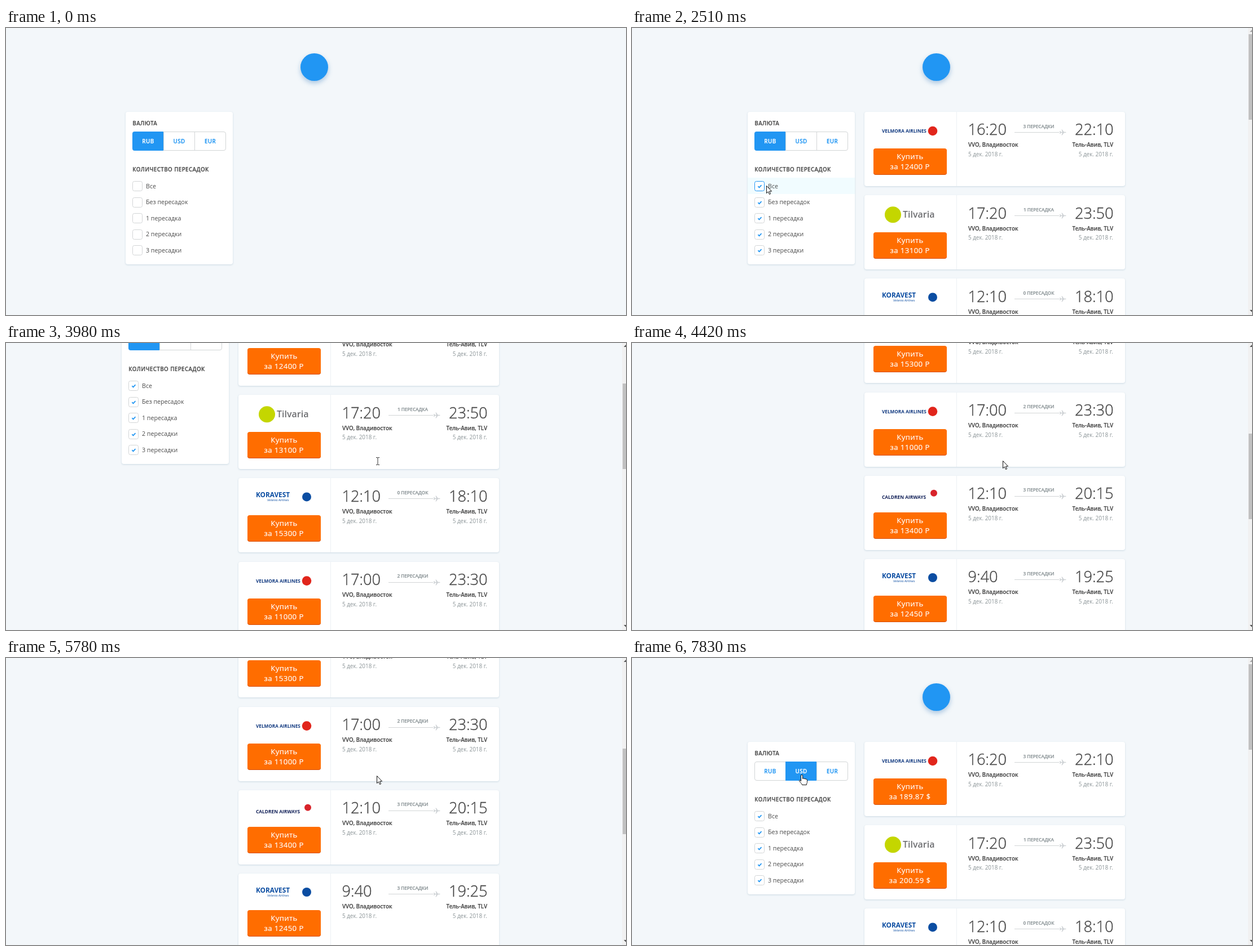
Animation of 1099 by 510 pixels, one loop 8 s. Source, as an HTML page:

```html
<!DOCTYPE html>
<html lang="ru">
<head>
<meta charset="utf-8">
<title>Билеты</title>
<style>
  html, body { margin: 0; width: 100%; height: 100%; overflow: hidden; background: #f3f7fa; }
  svg { display: block; width: 100vw; height: 100vh; font-family: "Open Sans", sans-serif; fill: #4a4a4a; }
  .box { fill: #fff; filter: drop-shadow(0 1px 1.6px rgba(91, 137, 164, .27)); }
  .badge { fill: #2196f3; filter: drop-shadow(0 4px 4px rgba(33, 110, 180, .35)); }
  .line { fill: none; stroke: #d2d5d6; }
  .head { font-size: 9.8px; font-weight: 600; letter-spacing: .41px; stroke: #4a4a4a; stroke-width: .22; }
  .label { font-size: 10.65px; }
  .time { font-size: 27.2px; font-weight: 300; stroke: #4a4a4a; stroke-width: .4; }
  .city { font-size: 9.8px; font-weight: 600; stroke: #4a4a4a; stroke-width: .22; }
  .date { font-size: 9.9px; fill: #8b9497; }
  .stops { font-size: 8.17px; font-weight: 600; fill: #8b9497; stroke: #8b9497; stroke-width: .22; }
  .buy { font-size: 13.2px; letter-spacing: .41px; fill: #fff; stroke: #fff; stroke-width: .2; }
  .mid { text-anchor: middle; }
  .end { text-anchor: end; }
  .tick { fill: none; stroke: #2196f3; stroke-width: 1.7; }
</style>
</head>
<body>
<svg id="stage" viewBox="0 0 1099 510"></svg>
<script>
const LOOP = 8000, SHOW = 2320, SWITCH = 7750, RATE = 65.307;
const TOP = 149, PITCH = 148.2, ROW = 28.6, BAR_SHIFT = -7;

const tabs = ['RUB', 'USD', 'EUR'];
const filters = ['Все', 'Без пересадок', '1 пересадка', '2 пересадки', '3 пересадки'];
const stopWords = ['ПЕРЕСАДОК', 'ПЕРЕСАДКА', 'ПЕРЕСАДКИ', 'ПЕРЕСАДКИ'];

// carrier, departure, arrival, stops, price
const flights = [
  ['velmora', '16:20', '22:10', 3, 12400],
  ['tilvaria', '17:20', '23:50', 1, 13100],
  ['koravest', '12:10', '18:10', 0, 15300],
  ['velmora', '17:00', '23:30', 2, 11000],
  ['caldren', '12:10', '20:15', 3, 13400],
  ['koravest', '9:40', '19:25', 3, 12450],
  ['velmora', '17:10', '23:45', 1, 13600],
  ['velmora', '6:10', '15:25', 0, 14250],
  ['koravest', '16:50', '23:35', 1, 16700],
  ['tilvaria', '18:20', '23:55', 2, 14900]
];

const text = (cls, x, y, s, extra = '') => `<text class="${cls}" x="${x}" y="${y}" ${extra}>${s}</text>`;
const dot = (x, y, r, fill) => `<circle cx="${x}" cy="${y}" r="${r}" fill="${fill}"/>`;
const word = (x, y, size, fill, s, weight = 700, style = 'normal') =>
  text('', x, y, s, `font-size="${size}" font-weight="${weight}" font-style="${style}" fill="${fill}"`);

const carriers = {
  velmora: word(443, 37, 8.2, '#123a80', 'VELMORA AIRLINES') + dot(533, 34, 8.3, '#e1251b'),
  tilvaria: dot(462.5, 34.5, 14.5, '#c4d600') + word(480, 40, 16, '#6d6e71', 'Tilvaria', 600),
  koravest: word(443, 34, 11.8, '#0b4da2', 'KORAVEST') +
    word(463, 41, 5.8, '#0b4da2', 'Velenia Airlines', 400, 'italic') + dot(533, 33, 8, '#0b4da2'),
  caldren: word(443, 41, 8.4, '#14235a', 'CALDREN AIRWAYS') + dot(535, 31, 6, '#d8232a')
};

const plane = 'M758.5 36.5l-.4-2.6h1l1.2 1.8h2.7l-1.6-4.2h1.2l3 4.2h2.4q1.6 .3 1.6 .8t-1.6 .8h-2.4l-3 4.2h-1.2l1.6-4.2h-2.7l-1.2 1.8h-1z';

// Boxes sit on whole pixels, text keeps its fraction.
function card([carrier, dep, arr, stops], i) {
  const exact = TOP + i * PITCH, y = Math.round(exact), f = exact - y;
  const button = Math.round(exact + 65.4) - y;
  return `<g transform="translate(0 ${y})">
    <rect class="box" x="412" width="462" height="132" rx="4"/>
    <path d="M575.5 0V132" stroke="#edf1f4"/>
    <g transform="translate(0 ${f})">${carriers[carrier]}</g>
    <rect x="428" y="${button + 1}" width="130" height="46" rx="4" fill="#d64d08"/>
    <rect x="428" y="${button}" width="130" height="46" rx="4" fill="#ff6d00"/>
    ${text('buy mid', 493, button + 18.9, 'Купить')}
    ${text('buy mid price', 492.6, button + 36.9, '')}
    ${text('time', 595.5, 41.3 + f, dep)}
    ${text('time end', 853.5, 41.3 + f, arr)}
    ${text('city', 596, 62.4 + f, 'VVO, Владивосток')}
    ${text('city end', 853, 62.4 + f, 'Тель-Авив, TLV')}
    ${text('date', 596, 79.2 + f, '5 дек. 2018 г.')}
    ${text('date end', 853, 79.2 + f, '5 дек. 2018 г.')}
    ${text('stops mid', 721, 28.6 + f, stops + ' ' + stopWords[stops])}
    <path class="line" d="M678 36.5H757"/>
    <path d="${plane}" fill="#cdd1d4"/>
  </g>`;
}

function filterRow(label, i) {
  const y = Math.round(281 + i * ROW);
  return `<rect class="hot" x="212" y="${y - 15}" width="190" height="29" fill="#f1fcff" visibility="hidden"/>
    <rect class="line check" x="224.5" y="${y - 8.5}" width="17" height="17" rx="3" style="fill:#fff"/>
    <path class="tick" d="M230.4 ${y + .2}l2.1 2.2l4-4.2"/>
    ${text('label', 248, 284.6 + i * ROW, label)}`;
}

function cellPath(i) {
  const x = 224.5 + i * 55, r = x + 54;
  const a = i === 0 ? 3 : 0, b = i === 2 ? 3 : 0;
  return `M${x + a} 184.5H${r - b}q${b} 0 ${b} ${b}V${217.5 - b}q0 ${b} ${-b} ${b}H${x + a}` +
    `q${-a} 0 ${-a} ${-a}V${184.5 + a}q0 ${-a} ${a} ${-a}z`;
}

const stage = document.getElementById('stage');
stage.innerHTML = `
  <rect width="1099" height="510" fill="#f3f7fa"/>
  <g id="page">
    <g id="side">
      <circle class="badge" cx="546.5" cy="69.5" r="24.5"/>
      <rect class="box" x="212" y="149" width="190" height="271" rx="4"/>
      ${text('head', 224.3, 172.6, 'ВАЛЮТА')}
      <rect class="line" x="224.5" y="184.5" width="165" height="33" rx="3.5"/>
      <path class="line" d="M279.5 184.5V217.5M334.5 184.5V217.5"/>
      <path id="over" stroke="#2196f3" fill="#f2fcff"/>
      <path id="chosen" stroke="#2196f3" fill="#2196f3"/>
      ${tabs.map((s, i) => text('head mid tab', 251.9 + i * 55.1, 204.7, s)).join('')}
      ${text('head', 224.3, 254.6, 'КОЛИЧЕСТВО ПЕРЕСАДОК')}
      ${filters.map(filterRow).join('')}
    </g>
    <g id="cards">${flights.map(card).join('')}</g>
  </g>
  <g id="bar">
    <rect x="1092" width="7" height="510" fill="#f1f1f1"/>
    <rect id="thumb" x="1093" width="6" height="152" fill="#c1c1c1"/>
    <path id="up" d="M1095 7L1099 3V7z"/>
    <path d="M1095 501H1099V505z" fill="#505050"/>
  </g>
  <path id="pointer" stroke-linejoin="round"/>`;

const $ = id => document.getElementById(id);
const all = cls => [...stage.getElementsByClassName(cls)];
const prices = all('price'), hots = all('hot'), checks = all('check'), ticks = all('tick'), tabTexts = all('tab');

const shapes = {
  arrow: { d: 'M.5 .5V13.6L3.5 10.9L5.5 15.6L7.6 14.7L5.6 10.1H9.6z', fill: '#fff', stroke: '#111' },
  hand: {
    d: 'M-1.5 11V1a1.5 1.5 0 0 1 3 0V6.5c.5-1 3-.8 3 .5c.5-1 2.8-.7 2.8 .8c.6-.8 2.2-.3 2.2 1V12.5c0 2-1.2 2.5-1.2 5H.5c0-2.5-4.5-5-5-7.5c0-1.5 1.8-1.5 3 1z',
    fill: '#fff', stroke: '#111'
  },
  beam: { d: 'M-3-6.5h2.2l.8.8l.8-.8H3M0-6V6M-3 6.5h2.2l.8-.8l.8 .8H3', fill: 'none', stroke: '#333' }
};

const scrollKeys = [[3690, 0], [3980, 204], [4420, 506], [4470, 530], [4510, 530], [4990, 1000], [5235, 1000],
  [5250, 982], [5550, 600], [5700, 600], [5960, 300], [6130, 300], [6290, 152], [6480, 0]];

const pointerKeys = [[450, 901, 480], [1130, 335, 163], [1190, 349, 165], [1260, 349, 165], [1780, 240, 285],
  [1860, 238, 280], [3050, 238, 280], [3440, 659, 210], [4200, 659, 210], [4201, 657, 209], [6520, 657, 209],
  [6940, 328, 242], [6970, 328, 242], [7320, 303, 212], [7510, 303, 212], [7550, 301, 208]];

const linear = u => u;
const smooth = u => u * u * (3 - 2 * u);

function track(keys, t, ease) {
  const n = keys.findIndex(k => k[0] > t);
  if (n === 0) return keys[0].slice(1);
  if (n < 0) return keys[keys.length - 1].slice(1);
  const a = keys[n - 1], b = keys[n];
  const u = ease((t - a[0]) / (b[0] - a[0]));
  return a.slice(1).map((v, i) => v + (b[i + 1] - v) * u);
}

const set = (el, attrs) => { for (const k in attrs) el.setAttribute(k, attrs[k]); };
const show = (el, on) => el.setAttribute('visibility', on ? 'visible' : 'hidden');

let currency = -1;
function setCurrency(n) {
  if (n === currency) return;
  currency = n;
  prices.forEach((el, i) => {
    const sum = flights[i][4];
    el.textContent = 'за ' + (n ? (sum / RATE).toFixed(2) + ' $' : sum + ' Р');
  });
  set($('chosen'), { d: cellPath(n) });
  tabTexts.forEach((el, i) => {
    const ink = i === n ? '#fff' : '#2196f3';
    set(el, { style: `fill:${ink};stroke:${ink}` });
  });
}

function draw(t) {
  const loaded = t >= SHOW;
  const shift = loaded ? BAR_SHIFT : 0;
  const scroll = Math.round(track(scrollKeys, t, linear)[0]);
  const [x, y] = track(pointerKeys, t, smooth);

  setCurrency(t >= SWITCH ? 1 : 0);
  set($('page'), { transform: `translate(0 ${-scroll})` });
  set($('side'), { transform: `translate(${shift} 0)` });
  show($('cards'), loaded);
  show($('bar'), loaded);
  set($('thumb'), { y: Math.round(11 + scroll * .2965) });
  set($('up'), { fill: scroll ? '#505050' : '#a3a3a3' });

  const px = x - shift, py = y + scroll, moving = t >= 450;
  const inTabs = moving && px > 224 && px < 389 && py > 184 && py < 218;
  const tab = inTabs ? Math.floor((px - 224) / 55) : -1;
  const row = moving && px > 212 && px < 402 ? Math.floor((py - 266.5) / ROW) : -1;

  show($('over'), inTabs);
  if (inTabs) set($('over'), { d: cellPath(tab) });
  hots.forEach((el, i) => show(el, i === row));
  checks.forEach((el, i) => set(el, { style: `fill:#fff;stroke:${i === row ? '#2196f3' : '#d2d5d6'}` }));
  const ink = Math.min(1, Math.max(0, (t - SHOW + 40) / 190));
  ticks.forEach(el => set(el, { opacity: loaded ? ink : 0 }));

  const kind = inTabs ? 'hand' : t >= 3420 && t < 4200 ? 'beam' : 'arrow';
  show($('pointer'), moving);
  set($('pointer'), { ...shapes[kind], transform: `translate(${Math.round(x)} ${Math.round(y)})` });
}

function frame() {
  draw(performance.now() % LOOP);
  requestAnimationFrame(frame);
}
frame();
</script>
</body>
</html>
```
